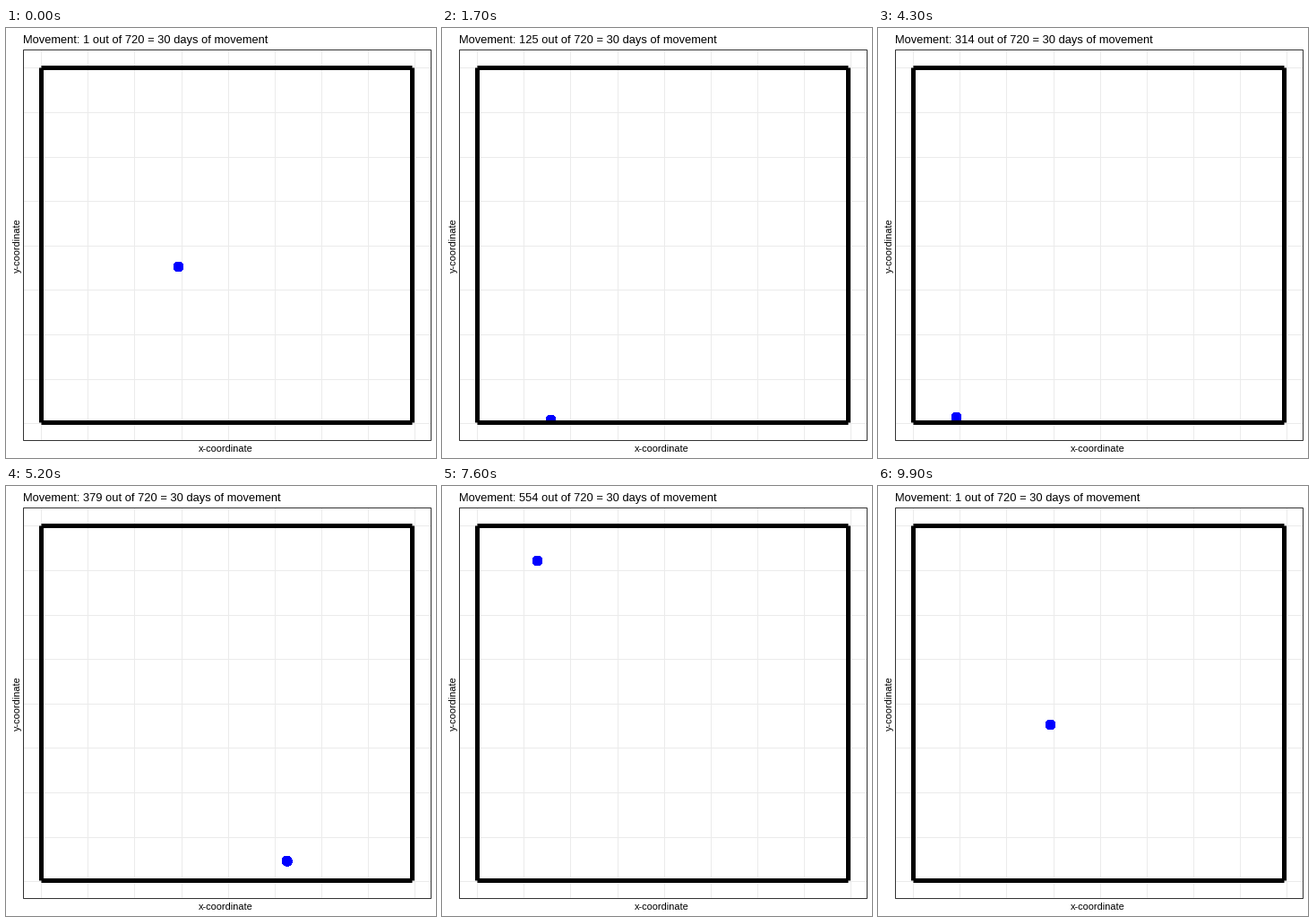
Write a matplotlib script that moves like this. It is 480 px wide and 480 px high and loops after 10000 ms.

```python
import numpy as np
import matplotlib.pyplot as plt
from matplotlib.animation import FuncAnimation
from matplotlib.patches import Circle, Rectangle

SIZE, DPI = 480, 100
FRAMES, INTERVAL = 100, 100
LAST = FRAMES - 1
STEPS = 720
PX = 72 / DPI  # points per pixel
LEFT, RIGHT, TOP, BOTTOM = 39.5, 453.5, 44.5, 440.5

# Key stops of the walk: frame, x, y
START = (192.5, 266.5)
STOPS = np.array([
    (0, *START), (9, 430, 385), (17, 121.5, 437.5), (32, 94.5, 388.5),
    (43, 87.5, 434.5), (53, 356, 430), (60, 248.5, 109.5), (66, 70, 100),
    (76, 106.5, 83.5), (88, 100, 90), (94, 396, 140), (LAST, *START),
])

plt.rcParams["font.family"] = "Liberation Sans"
fig = plt.figure(figsize=(SIZE / DPI, SIZE / DPI), dpi=DPI, facecolor="white")
ax = fig.add_axes([0, 0, 1, 1])
ax.set_xlim(0, SIZE)
ax.set_ylim(SIZE, 0)
ax.axis("off")


def line(x0, y0, x1, y1, color, width, z):
    ax.plot([x0, x1], [y0, y1], color=color, lw=width * PX, snap=False,
            solid_capstyle="butt", zorder=z)


def label(x, y, text, size, **kw):
    return ax.text(x, y, text, fontsize=size * PX, color="black",
                   va="baseline", **kw)


def walk(i):
    """Dot position: straight legs that sway to the left, kept inside the walls."""
    leg = min(np.searchsorted(STOPS[:, 0], i, side="right"), len(STOPS) - 1)
    (t0, *a), (t1, *b) = STOPS[leg - 1], STOPS[leg]
    u = (i - t0) / (t1 - t0)
    sway = np.array([-50 * np.sin(np.pi * u), 20 * np.sin(2 * np.pi * u)])
    pos = np.array(a) * (1 - u) + np.array(b) * u + sway
    return np.clip(pos, (LEFT, TOP), (RIGHT, BOTTOM))


for k in range(9):
    gx = round(39.2 + 52.12 * k) + 0.5
    gy = round(44.4 + 49.6 * k) + 0.5
    line(gx, 25, gx, 460, "#ebebeb", 1, 1)
    line(20, gy, 474, gy, "#ebebeb", 1, 1)

for x in (LEFT, RIGHT):
    line(x, TOP, x, BOTTOM, "black", 5, 3)
for y in (TOP, BOTTOM):
    line(LEFT, y, RIGHT, y, "black", 5, 3)

ax.add_patch(Rectangle((19.5, 24.5), 455, 436, fill=False, ec="#333333",
                       lw=PX, snap=False, zorder=4))

title = label(19, 17, "", 12.92, ha="left")
label(245.5, 473, "x-coordinate", 11, ha="center")
label(16, 242.5, "y-coordinate", 11, ha="center", rotation=90,
      rotation_mode="anchor")
dot = ax.add_patch(Circle(START, 5.5, fc="blue", ec="none", zorder=2,
                          antialiased=False))


def update(i):
    step = round(i * STEPS / LAST) % STEPS + 1
    title.set_text(f"Movement: {step} out of {STEPS} = 30 days of movement")
    dot.center = tuple(walk(i))
    return title, dot


anim = FuncAnimation(fig, update, frames=FRAMES, interval=INTERVAL,
                     repeat=True, repeat_delay=0)
plt.show()
```
